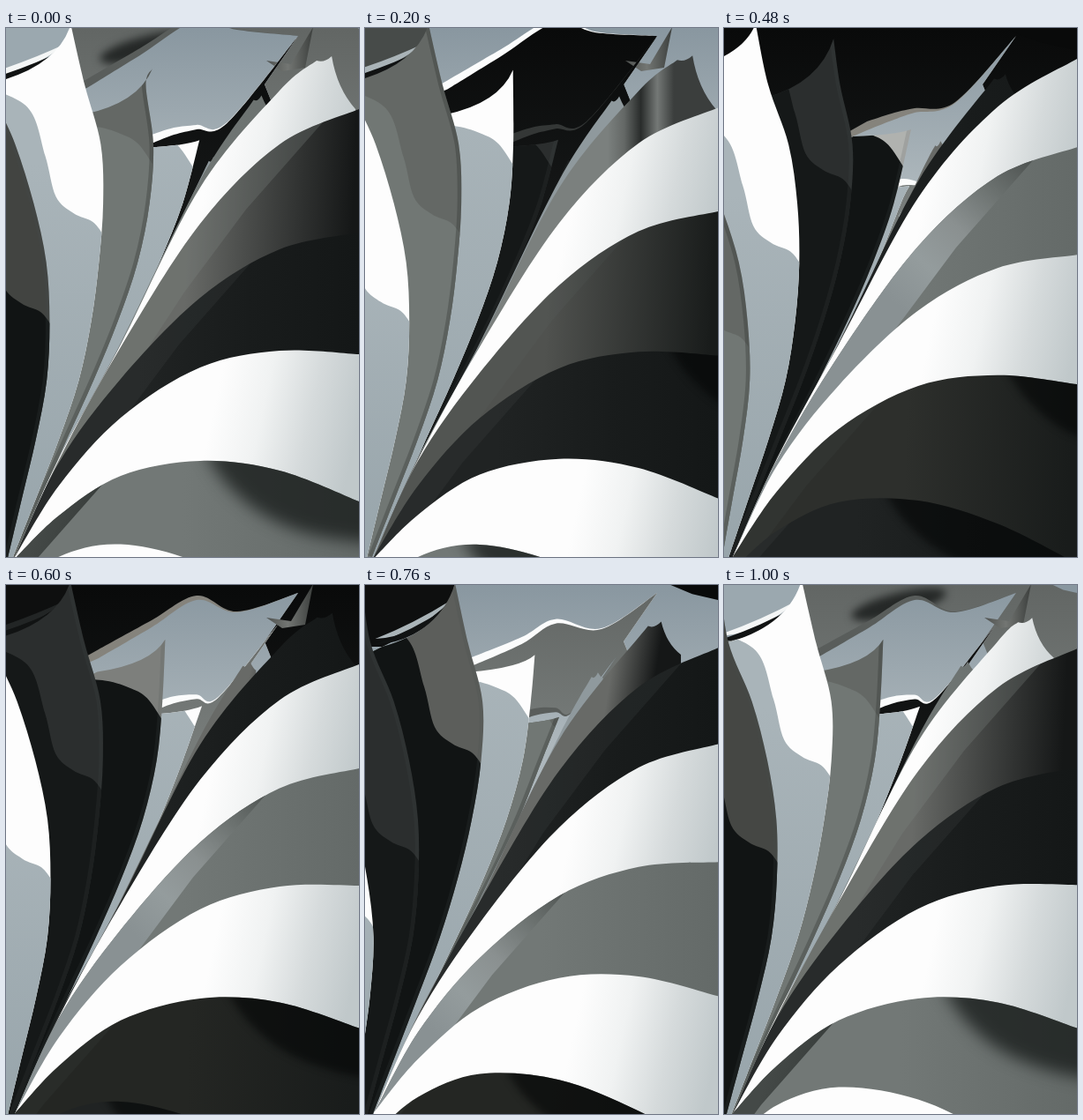
An HTML page with a canvas that plays this animation: 400 px wide and 600 px high, repeating every 1.04 s.

```html
<!DOCTYPE html>
<html lang="en">
<head>
<meta charset="utf-8">
<title>Unfolding petals</title>
<style>
html, body { margin: 0; width: 100%; height: 100%; overflow: hidden; background: #0b0c0c; }
canvas { display: block; width: 400px; height: 600px; }
</style>
</head>
<body>
<canvas id="stage" width="400" height="600"></canvas>
<script>
const ctx = document.getElementById('stage').getContext('2d');
const LOOP = 1040, STEP = 40, LAG = 435;

// Surface colours, and the ages of the five petals of one cycle.
const WHITE = { name: 'white', top: '#fdfdfd', low: '#a2aeb4', back: '#8997a0', base: '#adb7bc', band: '#fbfcfc', hood: '#9ba8af' };
const GRAY = { name: 'gray', top: '#646865', low: '#717774', back: '#626664', base: '#777c7a', band: '#595d5b', hood: '#474b49' };
const BLACK = { name: 'black', top: '#2b2e2e', low: '#151818', back: '#090a0a', base: '#141616', band: '#343736', hood: '#0e0f0f' };
const DARK = { name: 'dark', top: '#5c5d59', low: '#111414', back: '#090a0a', base: '#141616', band: '#85837c', hood: '#0e0f0f' };
const CYCLE = [[WHITE, 837], [GRAY, 640], [WHITE, 436], [BLACK, 238], [DARK, 0]];

// Right petals: age, then the height of the upper edge at each x.
const XS = [10, 60, 130, 220, 310, 400];
const RIGHT = [
  [-480, 600, 488, 357, 171, 40, -20],
  [-203, 600, 488, 359, 181, 71, 10],
  [0, 600, 490, 362, 222, 132, 92],
  [238, 600, 493, 398, 306, 251, 232],
  [436, 600, 519, 442, 385, 366, 370],
  [640, 602, 553, 508, 491, 502, 537],
  [838, 640, 600, 586, 608, 660, 720]
];
// age, tip x, tip y, offset of the outer corner
const RIGHT_TIP = [
  [-640, 222, 165, 6, 5],
  [-482, 257, 104, 13, 0],
  [-402, 280, 82, 18, 11],
  [-282, 320, 47, 37, 32],
  [-203, 352, 37, 44, 55],
  [-130, 415, 10, 55, 110]
];

// Left petals: age, then the reach of the right edge at each y.
const YS = [0, 130, 270, 430, 600];
const LEFT = [
  [0, 215, 218, 172, 93, 10],
  [205, 150, 167, 148, 85, 10],
  [325, 100, 133, 120, 74, 9],
  [405, 70, 106, 104, 74, 8],
  [520, 5, 54, 74, 56, 4],
  [685, -90, -32, 18, 28, -2],
  [860, -180, -115, -50, -14, -30]
];
// age, tip x, tip y, height where the hem meets the next petal
const LEFT_TIP = [
  [-160, 210, 180, 182],
  [-40, 222, 138, 147],
  [45, 212, 115, 123],
  [120, 193, 80, 99],
  [205, 166, 46, 98],
  [325, 102, -2, 70],
  [405, 72, -4, 64],
  [860, -150, -10, 0]
];
// Far rims: age, shoulder x, y, peak y, dip x, y
const RIM = [
  [-160, 200, 172, 174, 228, 178],
  [-40, 190, 127, 125, 240, 128],
  [45, 190, 97, 91, 262, 84],
  [120, 178, 60, 40, 268, 50],
  [165, 165, 40, 12, 262, 30],
  [245, 140, 5, -40, 262, -30]
];
const SHADE_Y = [[0, 160], [205, 158], [325, 205], [480, 268], [600, 335], [760, 390]];
const TIP_TONE = [[45, 176], [165, 125], [325, 92], [600, 66]];
const DARK_TONE = [[0, 104], [120, 94], [320, 60], [600, 36]];

const mix = (a, b, u) => a + (b - a) * u;
const clamp = (v, lo = 0, hi = 1) => Math.min(hi, Math.max(lo, v));
const grey = v => `rgb(${v | 0},${(v + 2) | 0},${(v - 1) | 0})`;

// Smooth interpolation between the rows of a table.
function at(table, s) {
  const last = table.length - 1;
  if (s <= table[0][0]) return table[0].slice(1);
  if (s >= table[last][0]) return table[last].slice(1);
  let i = 1;
  while (s > table[i][0]) i++;
  const a = table[i - 1], b = table[i], p = table[i - 2] || a, n = table[i + 1] || b;
  const h = b[0] - a[0], u = (s - a[0]) / h, v = 1 - u;
  return a.slice(1).map((from, k) => {
    const j = k + 1, to = b[j];
    const m0 = (to - p[j]) / (b[0] - p[0]) * h, m1 = (n[j] - from) / (n[0] - a[0]) * h;
    return v * v * (1 + 2 * u) * from + u * u * (1 + 2 * v) * to + u * v * (v * m0 - u * m1);
  });
}

function lookup(xs, ys, x) {
  let i = 1;
  while (i < xs.length - 1 && x > xs[i]) i++;
  const near = (a, b) => a >= 0 && b < ys.length;
  const u = (x - xs[i - 1]) / (xs[i] - xs[i - 1]);
  const y = mix(ys[i - 1], ys[i], u);
  if (!near(i - 2, i + 1) || u < 0 || u > 1) return y;
  return y - u * (1 - u) * (ys[i - 2] - ys[i - 1] - ys[i] + ys[i + 1]) / 4;
}

// Smooth curve through the points.
function curve(path, pts) {
  path.moveTo(...pts[0]);
  for (let i = 0; i < pts.length - 1; i++) {
    const a = pts[i - 1] || pts[i], b = pts[i], c = pts[i + 1], d = pts[i + 2] || c;
    path.bezierCurveTo(b[0] + (c[0] - a[0]) / 6, b[1] + (c[1] - a[1]) / 6,
      c[0] - (d[0] - b[0]) / 6, c[1] - (d[1] - b[1]) / 6, c[0], c[1]);
  }
}

function poly(pts, fill) {
  ctx.beginPath();
  pts.forEach(p => ctx.lineTo(...p));
  ctx.fillStyle = fill;
  ctx.fill();
}

function ramp(x0, y0, x1, y1, ...colors) {
  const g = ctx.createLinearGradient(x0, y0, x1, y1);
  colors.forEach((c, i) => g.addColorStop(i / (colors.length - 1), c));
  return g;
}

function inside(path, draw) {
  ctx.save();
  ctx.clip(path);
  draw();
  ctx.restore();
}

function rimEnd(age) {
  const u = clamp((age + 160) / 160);
  return [mix(235, 331, u), mix(160, 9, u)];
}

function rimPath(age, depth) {
  const [mx, my, py, dx, dy] = at(RIM, age), [ex, ey] = rimEnd(age), path = new Path2D();
  const lx = mx - clamp(age / 2, 28, 60), ly = my + clamp(age / 5, 9, 35);
  curve(path, [[lx, ly + 10 * depth], [mx, my + 8 * depth], [216, py + 5 * depth], [dx, dy + depth], [ex, ey]]);
  path.lineTo(ex - 38, ey + 55);
  path.lineTo(ex - 20, ey + 100);
  path.lineTo(300, 320);
  path.lineTo(40, 320);
  path.lineTo(lx - 80, ly + 45);
  path.closePath();
  return path;
}

function drawRear({ kind, left }, outer) {
  const old = outer.left, fill = ramp(0, 0, 0, 180, kind.back, kind.base);
  if (old >= 230) {
    ctx.fillStyle = fill;
    ctx.fillRect(0, 0, 400, 600);
    if (kind === GRAY) {
      ctx.save();
      ctx.filter = 'blur(5px)';
      ctx.fillStyle = '#252827';
      ctx.beginPath();
      ctx.ellipse(mix(198, 160, (left - 165) / 40), 22, 55, 13, -0.25, 0, 7);
      ctx.fill();
      ctx.restore();
    }
    if (old < 405) {
      const x = mix(400, 338, (405 - old) / 85), y = mix(0, 18, (405 - old) / 85);
      poly([[x, -2], [(x + 400) / 2, y * 0.6], [400, y], [400, -2]], outer.kind.back);
    }
    return;
  }
  ctx.fillStyle = outer.kind.band;
  ctx.fill(rimPath(old, 0));
  ctx.fillStyle = fill;
  ctx.fill(rimPath(old, 1));
  if (old > 140) {
    const [x, y] = rimEnd(old);
    poly([[x - 36, y + 28], [x - 8, y + 32], [x + 17, y - 10], [x + 8, y + 36], [x - 18, y + 40]],
      ramp(x - 38, 0, x + 15, 0, '#4b4e4c', '#737673', '#404341'));
  }
}

function lens(x0, y0, x1, y1, bend, width, fill) {
  const mx = (x0 + x1) / 2, my = (y0 + y1) / 2 + bend;
  ctx.beginPath();
  ctx.moveTo(x0, y0);
  ctx.quadraticCurveTo(mx, my, x1, y1);
  ctx.quadraticCurveTo(mx, my + width, x0, y0);
  ctx.fillStyle = fill;
  ctx.fill();
}

function drawHood(kind, tx, hemX, hemY) {
  ctx.beginPath();
  ctx.moveTo(-5, -5);
  ctx.lineTo(tx, -5);
  ctx.lineTo(tx - 5, 25);
  ctx.quadraticCurveTo(tx - 25, 42, hemX, hemY);
  ctx.lineTo(-5, hemY);
  ctx.fillStyle = kind.hood;
  ctx.fill();
  const pale = kind === WHITE ? '#f4f6f6' : kind === BLACK ? '#222525' : '#aab4b8';
  lens(hemX - 8, hemY - 9, tx - 4, 17, 5, 16, pale);
  lens(hemX - 8, hemY - 3, tx - 6, 24, 6, 16, '#111313');
}

function drawLeft({ kind, left: age }) {
  const edge = at(LEFT, age), [tx, ty, hemY] = at(LEFT_TIP, age);
  const hemX = lookup(YS, at(LEFT, age + 202), hemY) - 8;
  if (age > 285 && age < 480) drawHood(kind, tx, hemX, hemY);

  const pts = [[tx, ty]];
  for (let y = 65; y <= 600; y += 66.875) {
    if (y > ty + 18) pts.push([lookup(YS, edge, y), y]);
  }
  const path = new Path2D();
  curve(path, pts);
  path.lineTo(-200, 600);
  path.lineTo(hemX - 60, hemY + 30);
  path.lineTo(hemX, hemY);
  path.quadraticCurveTo(tx - 16, mix(ty, hemY, 0.75), tx, ty);

  ctx.fillStyle = kind === DARK ? grey(at(TIP_TONE, age)[0]) : kind.top;
  ctx.fill(path);
  inside(path, () => {
    const [y] = at(SHADE_Y, age), x = lookup(YS, edge, y) + 2;
    const line = age < 250
      ? [[0, 0], [-18, -26], [-36, -37], [-66, -46], [-120, -50]]
      : [[0, 0], [-12, -15], [-34, -25], [-54, -44], [-66, -90], [-86, -145], [-140, -170]];
    const low = new Path2D();
    curve(low, line.map(p => [x + p[0], y + p[1]]));
    low.lineTo(-200, 0);
    low.lineTo(-200, 700);
    low.lineTo(300, 700);
    low.lineTo(300, y);
    ctx.fillStyle = kind === WHITE ? ramp(0, y - 80, 0, 600, '#a9b4b9', '#98a5ab') : kind.low;
    ctx.fill(low);
    if (kind !== WHITE) {
      // soft turn along the outer rim
      ctx.strokeStyle = kind === GRAY ? 'rgba(40,44,42,.3)' : 'rgba(70,76,76,.16)';
      ctx.lineWidth = 9;
      const rim = new Path2D();
      curve(rim, pts);
      ctx.stroke(rim);
    }
  });
}

function rightFill(kind, age, y) {
  if (kind === WHITE) {
    if (age < -380) return '#8f999d';
    return ramp(250, y, 410, y + 35, '#fdfdfd', '#f0f2f2', '#d5dadb', '#c0c8ca');
  }
  if (kind === GRAY) {
    if (age > -340 && age < -180) return ramp(275, 0, 350, 0, '#7b807e', '#646866', '#292c2b', '#747876', '#3b3e3d');
    return ramp(200, 0, 400, 0, '#727876', '#646a68');
  }
  if (kind === BLACK) return ramp(150, y, 400, y, '#202323', '#191c1c', '#141717');
  const u = clamp((age + 280) / 280);
  return ramp(mix(285, 210, u), y, mix(335, 396, u), y + 8,
    grey(at(DARK_TONE, age)[0]), age < 150 ? '#151717' : '#191c1b');
}

function drawCrease(kind, age, edge) {
  const x = Math.min(360, 385 - 0.425 * age), y = lookup(XS, edge, x);
  let fill = 'rgba(70,76,75,.2)';
  if (kind === GRAY) {
    fill = age < 450
      ? ramp(x, y, x - 150, y + 165, '#4e5351', '#6c7270', '#8a9090', '#949c9d', '#899193')
      : ramp(x - 60, y, x, y + 20, '#444947', '#373c3a');
  } else if (kind === DARK) {
    fill = `rgba(125,132,130,${age < 200 ? 0.28 : 0.06})`;
  }
  poly([[x, y - 4], [x - 88, y + 96], [x - 158, y + 190], [-20, 640], [-20, y - 40], [x, y - 40]], fill);
}

function drawBlot(kind, age, edge) {
  const x = 595 - 0.58 * age, y = lookup(XS, edge, x), blot = new Path2D();
  curve(blot, [[x, y - 12], [x + 28, y + 28], [x + 70, y + 62], [x + 125, y + 84], [430, y + 95]]);
  blot.lineTo(430, y - 40);
  ctx.filter = `blur(${kind === GRAY ? 9 : 4}px)`;
  ctx.fillStyle = kind === GRAY ? 'rgba(20,24,23,.75)' : 'rgba(4,6,6,.6)';
  ctx.fill(blot);
}

function drawRight({ kind, age }) {
  const edge = at(RIGHT, age), path = new Path2D();
  let pts = XS.map((x, i) => [x, edge[i]]);
  if (age < -130) {
    const [tx, ty, dx, dy] = at(RIGHT_TIP, age), wide = tx + 3 + dx * 0.32;
    pts = pts.filter(p => p[0] < tx - 18);
    pts.push([tx, ty]);
    curve(path, pts);
    path.quadraticCurveTo((tx + wide) / 2, ty + 3, wide, ty - 5);
    path.quadraticCurveTo(wide + 6, ty + dy / 2 + 4, tx + dx, ty + dy);
    path.lineTo(tx + dx, 600);
  } else {
    curve(path, pts);
    path.lineTo(400, 900);
  }
  path.lineTo(10, 900);
  path.closePath();
  ctx.fillStyle = rightFill(kind, age, edge[4]);
  ctx.fill(path);
  if (kind === WHITE || age < -130) return;
  inside(path, () => {
    drawCrease(kind, age, edge);
    if (age > 430) drawBlot(kind, age, edge);
  });
}

function draw(time) {
  const petals = [];
  for (let n = -2; n <= 1; n++) {
    for (const [kind, offset] of CYCLE) {
      const age = time + offset + n * LOOP;
      if (age > -640 && age < 1500) petals.push({ kind, age, left: age - LAG });
    }
  }
  petals.sort((a, b) => b.age - a.age);

  ctx.fillStyle = '#0b0c0c';
  ctx.fillRect(0, 0, 400, 600);
  petals.forEach((p, i) => {
    if (i && p.left > -360 && p.left < 420) drawRear(p, petals[i - 1]);
  });
  petals.reverse();
  petals.filter(p => p.left > -160 && p.left < 860).forEach(drawLeft);
  petals.filter(p => p.age < 850).forEach(drawRight);
}

const start = performance.now();
let shown = -1;
function tick() {
  const time = Math.floor(((performance.now() - start) % LOOP) / STEP) * STEP;
  if (time !== shown) draw(shown = time);
  requestAnimationFrame(tick);
}
tick();
</script>
</body>
</html>
```
